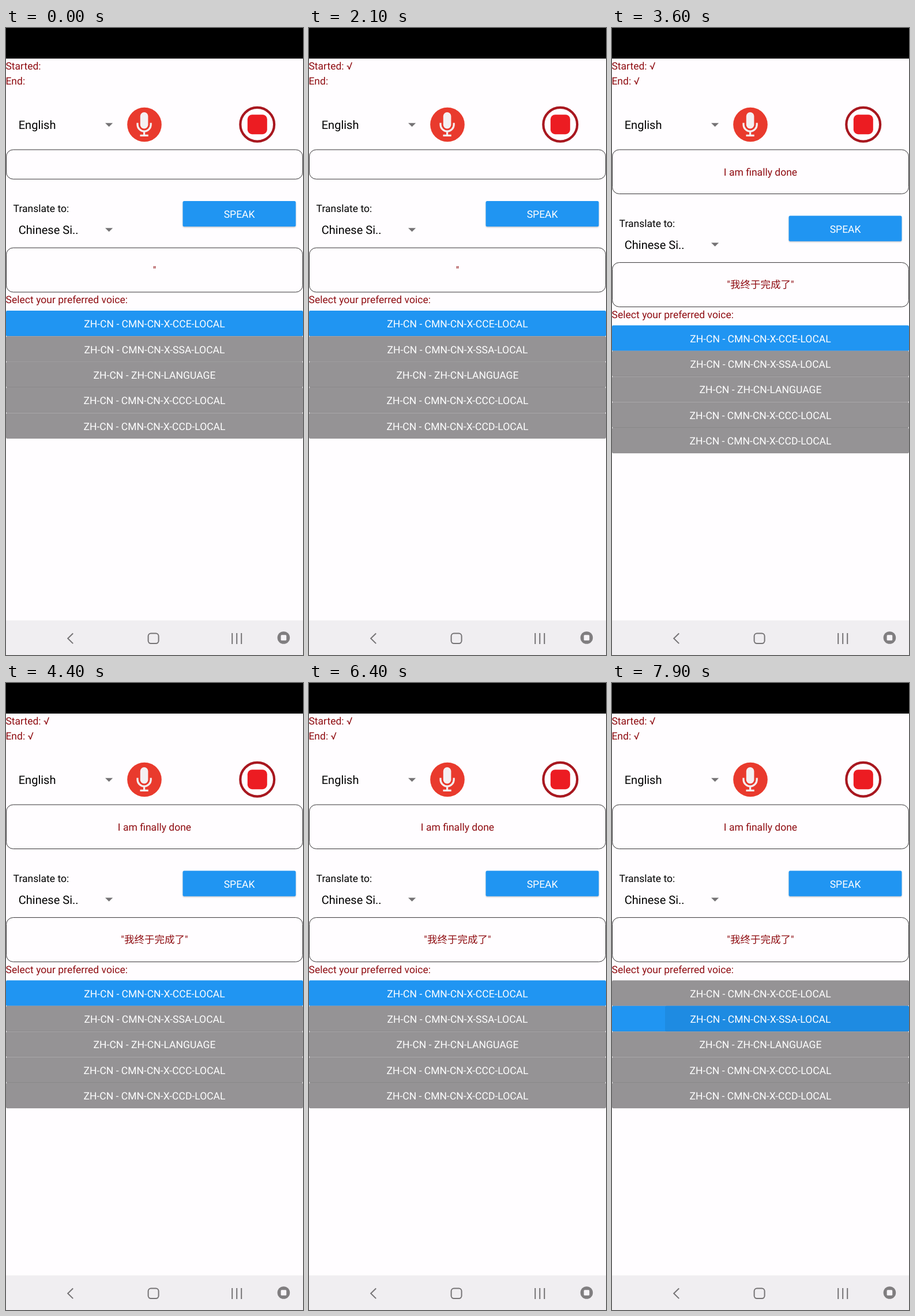
Write an HTML page that moves like this. It is 515 by 1087 pixels and loops after 8000 ms.

```html
<!DOCTYPE html>
<html lang="en">
<head>
<meta charset="utf-8">
<title>Speech translator</title>
<style>
  html, body { margin: 0; width: 515px; height: 1087px; overflow: hidden; background: #fffdff; }
  svg { display: block; }
  text { font: 17.54px Roboto, "Noto Sans CJK SC", "Noto Sans CJK", sans-serif; text-rendering: geometricPrecision; }
  .red { fill: #8f0d12; }
  .pick { font-size: 20.05px; }
  .mid { text-anchor: middle; }
  .btn { fill: #fff; text-anchor: middle; }
  .box { fill: none; stroke: #353335; stroke-width: 1; }
  .blue { fill: #2095f2; }
  .nav { fill: none; stroke: #757375; stroke-width: 2; }
</style>
</head>
<body>
<svg width="515" height="1087" viewBox="0 0 515 1087">
  <rect width="515" height="1087" fill="#fffdff"/>
  <rect width="515" height="53" fill="#000"/>

  <text class="red" id="started" x="-0.6" y="72.4"></text>
  <text class="red" id="ended" x="-0.6" y="98.2"></text>

  <text class="pick" x="21.7" y="175">English</text>
  <path d="M172 164.8h13.2l-6.6 6.5z" fill="#757375"/>

  <circle cx="240" cy="167.5" r="29.8" fill="#e93a2d"/>
  <g fill="none" stroke="#f4f0f2" stroke-width="3.2">
    <rect x="232.8" y="146" width="13.6" height="28.6" rx="6.8" fill="#f4f0f2" stroke="none"/>
    <path d="M228 164.5v3a11.6 11.6 0 0 0 23.2 0v-3M239.6 179v7M232.5 186.4h14.2"/>
  </g>

  <circle cx="435.7" cy="167.2" r="29.4" fill="#fffdff" stroke="#a8171f" stroke-width="4.2"/>
  <rect x="418.8" y="150.2" width="34" height="34" rx="8" fill="#ec1c22"/>

  <rect class="box" id="heard" x="0.5" y="211" width="514" height="51" rx="12"/>
  <text class="red mid" id="speech" x="257.5" y="255.5"></text>

  <g id="lower">
    <text x="12.6" y="319">Translate to:</text>
    <text class="pick" x="21.7" y="357">Chinese Si..</text>
    <path d="M172 346.8h13.2l-6.6 6.5z" fill="#757375"/>
    <rect x="306.5" y="301.4" width="196" height="44.4" rx="2.5" fill="#000" opacity=".2" style="filter:blur(1px)"/>
    <rect class="blue" x="306.5" y="300" width="196" height="44.3" rx="2.5"/>
    <text class="btn" x="404.6" y="329.2">SPEAK</text>
    <rect class="box" x="0.5" y="381.1" width="514" height="76.8" rx="12"/>
    <text class="red mid" id="result" x="257.5" y="425.8"></text>
    <text class="red" x="-0.4" y="477.2">Select your preferred voice:</text>
    <g id="voices"></g>
  </g>

  <rect y="1027" width="515" height="60" fill="#f0eef1"/>
  <path class="nav" d="M116.2 1049.5l-9 8.8 9 8.8M392.2 1049v19M400.2 1049v19M408.2 1049v19"/>
  <rect class="nav" x="246.6" y="1049.5" width="18" height="17.6" rx="4.8"/>
  <circle cx="481.4" cy="1057" r="10.8" fill="#807e80"/>
  <rect x="476.6" y="1052.2" width="9.6" height="9.6" rx="1.5" fill="#f7f5f8"/>
</svg>
<script>
const LOOP = 8000, ROW = 44.35, GROW = 25.5;
const BLUE = '#2095f2', GRAY = '#959395';
const at = { start: 700, grow: 2400, end: 3300, speech: 3300, result: 3600, press: 7900 };
const $ = id => document.getElementById(id);

function add(parent, tag, attrs, text = '') {
  const el = document.createElementNS('http://www.w3.org/2000/svg', tag);
  for (const key in attrs) el.setAttribute(key, attrs[key]);
  el.textContent = text;
  return parent.appendChild(el);
}

const names = ['CMN-CN-X-CCE-LOCAL', 'CMN-CN-X-SSA-LOCAL', 'ZH-CN-LANGUAGE', 'CMN-CN-X-CCC-LOCAL', 'CMN-CN-X-CCD-LOCAL'];
let ripple;
const rows = names.map((name, i) => {
  const y = 490 + i * ROW;
  const rect = add($('voices'), 'rect', { x: 0, y, width: 515, height: ROW, rx: 2.2 });
  if (i === 1) ripple = add($('voices'), 'rect', { x: 92, y, width: 423, height: ROW, rx: 2.5, fill: '#1e8be2' });
  add($('voices'), 'rect', { x: 1, y: y + ROW - 0.9, width: 513, height: 0.9, fill: '#000', opacity: 0.09 });
  add($('voices'), 'text', { class: 'btn', x: 257.5, y: y + 29.2 }, 'ZH-CN - ' + name);
  return rect;
});

function setText(id, value) {
  if ($(id).textContent !== value) $(id).textContent = value;
}

function draw(t) {
  const grown = t >= at.grow, pressed = t >= at.press;
  setText('started', t >= at.start ? 'Started: √' : 'Started:');
  setText('ended', t >= at.end ? 'End: √' : 'End:');
  setText('speech', t >= at.speech ? 'I am finally done' : '');
  setText('result', t >= at.result ? '"我终于完成了"' : '"');
  $('heard').setAttribute('height', grown ? 51 + GROW : 51);
  $('lower').setAttribute('transform', `translate(0 ${grown ? GROW : 0})`);
  rows.forEach((row, i) => row.setAttribute('fill', i === +pressed ? BLUE : GRAY));
  ripple.setAttribute('visibility', pressed ? 'visible' : 'hidden');
}

const origin = performance.now();
function tick() {
  draw((performance.now() - origin) % LOOP);
  requestAnimationFrame(tick);
}
draw(0);
requestAnimationFrame(tick);
</script>
</body>
</html>
```
